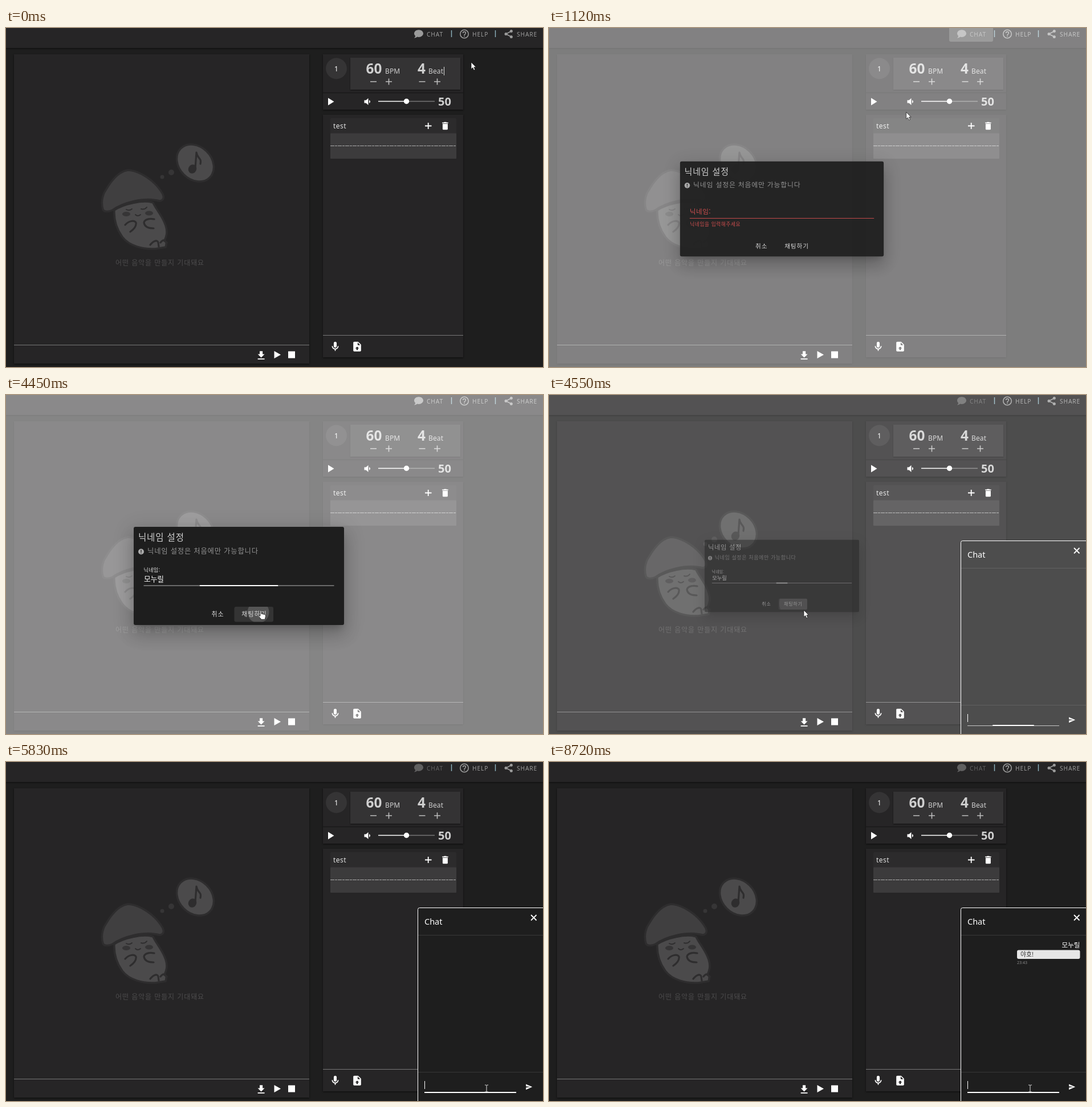
An HTML page that plays this animation: 942 by 594 pixels, repeating every 9220 ms.

```html
<!DOCTYPE html>
<html lang="ko">
<head>
<meta charset="utf-8">
<title>Chat nickname</title>
<style>
  html, body { margin: 0; width: 100%; height: 100%; overflow: hidden; background: #1e1e1e; }
  svg, #overlay, #dialog { position: absolute; left: 0; top: 0; }
  svg { display: block; }
  text { font-family: "Noto Sans", "Noto Sans CJK KR", sans-serif; fill: #fff; white-space: pre; }
  .ko { font-family: "Noto Sans CJK KR", "Noto Sans CJK", sans-serif; }
  .nav text { font-size: 10.2px; letter-spacing: .9px; fill: #9b9b9b; }
  .nav path { fill: #9b9b9b; }
  .big { font-weight: 700; fill: #cfcfcf; }
  .unit { font-size: 12px; letter-spacing: .15px; fill: #cfcfcf; }
  .panel { fill: #262526; filter: drop-shadow(0 1px 1.5px #0009); }
  .icon { fill: #fff; }
  .rule { stroke: #777; }
  .step { stroke: #bdbdbd; stroke-width: 1.6; fill: none; }
  .ink { stroke: #2e2d2e; stroke-width: 3.2; fill: none; stroke-linecap: round; stroke-linejoin: round; }
  #overlay { width: 942px; height: 594px; background: #fff; }
  #dialog { left: 224px; top: 231px; width: 369px; height: 172px; border-radius: 3px; background: #1e1e1e;
    box-shadow: 0 8px 11px -5px #0003, 0 18px 28px 2px #00000024, 0 7px 34px 6px #0000001f; }
</style>
</head>
<body>
<svg width="942" height="594" viewBox="0 0 942 594">
  <rect width="942" height="594" fill="#1e1e1e"/>
  <rect class="panel" x="-4" y="-4" width="950" height="39"/>

  <rect id="navGlow" x="702" y="-4" width="77" height="28" rx="3" fill="#fff"/>
  <g class="nav">
    <g id="chatNav">
      <path transform="translate(714.4 .8) scale(.8)" d="M12 3C17.5 3 22 6.58 22 11S17.5 19 12 19C10.76 19 9.57 18.82 8.47 18.5C5.55 21 2 21 2 21C4.33 18.67 4.7 17.1 4.75 16.5C3.05 15.07 2 13.13 2 11C2 6.58 6.5 3 12 3Z"/>
      <text x="738" y="14.5">CHAT</text>
    </g>
    <path transform="translate(794.4 .9) scale(.8)" d="M11 18H13V16H11V18M12 2A10 10 0 0 0 12 22A10 10 0 0 0 12 2M12 20A8 8 0 0 1 12 4A8 8 0 0 1 12 20M12 6A4 4 0 0 0 8 10H10A2 2 0 0 1 14 10C14 12 11 11.75 11 15H13C13 12.75 16 12.5 16 10A4 4 0 0 0 12 6Z"/>
    <text x="818" y="14.5">HELP</text>
    <path d="M886.5 5.5L877 10.5L886.5 15.5" style="fill:none;stroke:#9b9b9b;stroke-width:1.7"/>
    <g fill="#9b9b9b"><circle cx="886.3" cy="5.4" r="2.5"/><circle cx="877" cy="10.5" r="2.5"/><circle cx="886.3" cy="15.6" r="2.5"/></g>
    <text x="896" y="14.5">SHARE</text>
  </g>
  <path d="M781.5 4V16M858.5 4V16" stroke="#8fb4c0" stroke-width="1.4"/>

  <rect class="panel" x="14" y="46" width="518" height="542"/>
  <path class="rule" d="M14 555.5H532"/>
  <g class="icon">
    <path transform="translate(437.4 563.8) scale(.85)" d="M5 20H19V18H5M19 9H15V3H9V9H5L12 16L19 9Z"/>
    <path d="M470.5 566L482 572.5L470.5 579Z"/>
    <rect x="495" y="566.5" width="12" height="12"/>
  </g>

  <g stroke="#2e2d2e" stroke-width="3.5">
    <path fill="#4b4a4b" d="M190 319C205 309 240 300 258 306C262 316 275 330 280 346C284 358 281 366 278 373L282 376L280 384L262 387C240 388 216 382 204 366C194 352 189 336 190 319Z"/>
    <path fill="#403f40" d="M170 318C167 308 168 294 175 284C185 267 198 251 214 249C235 250 262 268 275 291C279 300 273 305 265 302C240 297 205 306 187 319C181 322 172 323 170 318Z"/>
    <ellipse fill="#4b4a4b" cx="332" cy="236.5" rx="36" ry="28.5" transform="rotate(45 332 236.5)"/>
  </g>
  <g fill="#363536">
    <ellipse cx="211" cy="326" rx="7" ry="4"/><ellipse cx="251" cy="324.5" rx="7" ry="4"/>
    <circle cx="274" cy="261" r="3.5"/><circle cx="290" cy="253" r="5"/>
  </g>
  <path class="ink" stroke-width="2" style="stroke-width:2" d="M211 318Q216 321 221 317M237 317Q243 319 247 314M227 327Q231 331 236 327"/>
  <path class="ink" d="M209 345C215 338 225 336 228 341C229 347 225 352 218 357M260 335C250 333 243 336 242 341C243 348 250 351 259 351M253 380C259 372 266 371 267 376L268 383M271 376C276 369 282 371 281 381"/>
  <ellipse cx="327" cy="247" rx="7" ry="8" fill="#2e2d2e" transform="rotate(25 327 247)"/>
  <path class="ink" d="M332 246L334 218C335 228 344 228 341 238"/>
  <text class="ko" x="192" y="416" font-size="12" letter-spacing=".9" font-weight="300" style="fill:#4c4b4c">어떤 음악을 만들지 기대돼요</text>

  <rect class="panel" x="556" y="46" width="246" height="97"/>
  <path d="M556 113.5H802" stroke="#191919" stroke-width="1.5"/>
  <circle cx="579.5" cy="71" r="18.5" fill="#353435"/>
  <text x="579.5" y="76" font-size="12" text-anchor="middle">1</text>
  <rect x="604" y="52" width="193" height="56" fill="#343334" style="filter:drop-shadow(0 1px 1px #0008)"/>
  <text class="big" x="631.5" y="80" font-size="24.3">60</text><text class="unit" x="665" y="80">BPM</text>
  <text class="big" x="722" y="80" font-size="24.3">4</text><text class="unit" x="741" y="80">Beat</text>
  <path id="beatCaret" d="M768.5 68V83" stroke="#ddd"/>
  <path class="step" d="M639 94H650M666 94H677M671.5 88.5V99.500M724.500 94H735.500M751 94H762M756.500 88.500V99.500"/>
  <path class="icon" d="M565 122.500L575.500 129L565 135.500ZM628.500 126.500H631.500L635.500 123V135L631.500 131.500H628.500ZM637 126Q641 129 637 132Z"/>
  <path d="M702 128.500H752" stroke="#757575" stroke-width="1.600"/>
  <path d="M653 128.500H702" stroke="#fff" stroke-width="1.600"/>
  <circle cx="702.500" cy="128.500" r="4.700" fill="#fff"/>
  <text class="big" x="758" y="135.500" font-size="20">50</text>

  <rect class="panel" x="556" y="152" width="246" height="425"/>
  <rect x="569" y="158" width="221" height="71" rx="2" fill="#2c2b2c"/>
  <rect x="569" y="184.500" width="221" height="44.500" rx="1" fill="#3c3b3c"/>
  <path d="M569 206.500H789" stroke="#aaa" stroke-dasharray="7 1 4 1"/>
  <text x="574" y="176" font-size="12" letter-spacing=".5" style="fill:#e4e4e4">test</text>
  <path d="M735 171.500H746.500M740.700 166V177" stroke="#fff" stroke-width="1.800"/>
  <path class="icon" transform="translate(761.400 162.500) scale(.75)" d="M19 4H15.500L14.500 3H9.500L8.500 4H5V6H19M6 19A2 2 0 0 0 8 21H16A2 2 0 0 0 18 19V7H6V19Z"/>
  <path class="rule" d="M556 538.500H802"/>
  <path class="icon" transform="translate(567.300 548) scale(.85)" d="M12 2A3 3 0 0 1 15 5V11A3 3 0 0 1 9 11V5A3 3 0 0 1 12 2M19 11C19 14.530 16.390 17.440 13 17.930V21H11V17.930C7.610 17.440 5 14.530 5 11H7A5 5 0 0 0 17 11H19Z"/>
  <path class="icon" fill-rule="evenodd" transform="translate(605.800 548) scale(.85)" d="M14 2H6C4.890 2 4 2.890 4 4V20C4 21.110 4.890 22 6 22H18C19.110 22 20 21.110 20 20V8L14 2M13.500 16V19H10.500V16H8L12 12L16 16H13.500M13 9V3.500L18.500 9H13Z"/>

  <g id="chat">
    <path d="M722.500 600V258.500Q722.500 255.500 725.500 255.500H950V600Z" fill="#1e1e1e" stroke="#fff"/>
    <text x="734" y="285" font-size="14.500" font-weight="500">Chat</text>
    <path d="M921 268L930.500 277.500M930.500 268L921 277.500" stroke="#fff" stroke-width="1.800"/>
    <path d="M723 303.500H942M723 543.500H942" stroke="#383838"/>
    <g id="message">
      <text class="ko" x="931.500" y="324.500" font-size="11.600" font-weight="500" text-anchor="end">모누릴</text>
      <rect x="821" y="329.500" width="110.500" height="15.500" rx="3" fill="#e6e6e6"/>
      <text class="ko" x="827" y="341" font-size="10.800" style="fill:#333">야호!</text>
      <text x="821" y="354" font-size="7" style="fill:#8a8a8a">23:43</text>
    </g>
    <text id="chatText" class="ko" x="735" y="570.500" font-size="11.600"></text>
    <path id="chatCaret" d="M.5 559V573" stroke="#fff"/>
    <path d="M734 579.500H895" stroke="#b5b5b5"/>
    <path id="chatLine" stroke="#fff" stroke-width="2"/>
    <path class="icon" transform="translate(911 563) scale(.53)" d="M2 21L23 12L2 3V10L17 12L2 14V21Z"/>
  </g>
</svg>

<div id="overlay"></div>

<div id="dialog">
  <svg width="369" height="172" viewBox="224 231 369 172">
    <clipPath id="buttonClip"><rect x="400.500" y="371" width="68.500" height="26.500" rx="3"/></clipPath>
    <text class="ko" x="232" y="255" font-size="15.500" letter-spacing=".85" style="fill:#d2d2d2">닉네임 설정</text>
    <circle cx="237" cy="274.500" r="5" fill="#aaa"/>
    <path d="M237 271.500V275.200M237 276.200V277.600" stroke="#1e1e1e" stroke-width="1.300"/>
    <text class="ko" x="248" y="278" font-size="12.300" letter-spacing=".82" style="fill:#929292">닉네임 설정은 처음에만 가능합니다</text>
    <text id="label" class="ko" font-size="12" letter-spacing=".5">닉네임:</text>
    <text id="error" class="ko" x="242" y="347.500" font-size="9" letter-spacing=".6" style="fill:#d04a4a">닉네임을 입력해주세요</text>
    <text id="nameText" class="ko" x="242" y="327" font-size="12.700" font-weight="500"></text>
    <path id="nameCaret" d="M.5 315V330" stroke="#fff"/>
    <path id="nameBase" d="M241.500 334H575.500"/>
    <path id="nameLine" stroke="#fff" stroke-width="2"/>
    <g clip-path="url(#buttonClip)">
      <rect id="hover" x="400" y="371" width="70" height="27" fill="#343434"/>
      <circle id="ripple" fill="#fff"/>
    </g>
    <text class="ko" x="360.500" y="388.300" font-size="11" letter-spacing=".98" style="fill:#ddd">취소</text>
    <text class="ko" x="413.300" y="388.300" font-size="11" letter-spacing=".98" style="fill:#ddd">채팅하기</text>
  </svg>
</div>

<svg width="942" height="594" viewBox="0 0 942 594">
  <g id="cursor" stroke-linejoin="round">
    <path id="arrow" d="M0 0V12L2.800 9.500L4.700 14L6.800 13L4.900 8.700H8.500Z" fill="#fff" stroke="#111" stroke-width=".7"/>
    <path id="hand" d="M-1 1.200Q0 -.6 1.200 1.200V6L7 7.200Q9 7.800 8.600 10.500L7.500 16H1L-3.500 10.500Q-3.500 8.600 -1 10Z" fill="#fff" stroke="#111" stroke-width=".8"/>
    <g id="beam" fill="none">
      <path d="M-3 -6H-.8L0 -5.200L.8 -6H3M0 -5.200V5.200M-3 6H-.8L0 5.200L.8 6H3" stroke="#ddd"/>
    </g>
  </g>
</svg>

<script>
const LOOP = 9220;
const $ = id => document.getElementById(id);
const clamp = v => Math.min(1, Math.max(0, v));

// Cubic bezier easing, solved by bisection.
function bezier(x1, y1, x2, y2) {
  const curve = (a, b, s) => 3 * a * s * (1 - s) ** 2 + 3 * b * s * s * (1 - s) + s ** 3;
  return x => {
    let lo = 0, hi = 1;
    for (let i = 0; i < 20; i++) {
      const mid = (lo + hi) / 2;
      if (curve(x1, x2, mid) < x) lo = mid; else hi = mid;
    }
    return x <= 0 ? 0 : x >= 1 ? 1 : curve(y1, y2, lo);
  };
}
const swing = bezier(.25, .8, .5, 1);
const pop = bezier(.25, .8, .25, 1);
const ramp = (t, start, ease = swing, length = 300) => ease(clamp((t - start) / length));
const linear = x => x;

// Time, x, y, shape from that time on.
const path = [
  [0, 816, 60, 'arrow'], [20, 816, 60, 'arrow'], [380, 718, 5, 'arrow'], [530, 720, 5, 'hand'],
  [980, 720, 5, 'hand'], [1010, 705, 26, 'arrow'], [1120, 627, 147, 'arrow'], [1500, 490, 295, 'arrow'],
  [1620, 465, 315, 'beam'], [1770, 452, 326, 'beam'], [3590, 452, 326, 'beam'], [3660, 452, 337, 'arrow'],
  [3950, 448, 378, 'arrow'], [4140, 446, 379, 'hand'], [4500, 447, 377, 'arrow'], [4600, 447, 377, 'arrow'],
  [5050, 868, 542, 'arrow'], [5260, 860, 582, 'arrow'], [5440, 859, 581, 'arrow'], [5540, 848, 573, 'beam'],
  [5690, 848, 573, 'beam'], [5830, 843, 572, 'beam'], [5990, 844, 572, 'beam'], [LOOP, 844, 572, 'beam']
];
const nameTyping = [[1840, ''], [2390, 'ㅁ'], [2500, '모'], [2730, '몬'], [2850, '모누'], [2950, '모눌'], [3050, '모누릴']];
const chatTyping = [[4500, ''], [6040, 'ㅇ'], [6200, '야'], [6500, '얗'], [6750, '야호'], [7310, '야호!'], [7650, '']];

const show = (id, on) => { $(id).style.visibility = on ? 'inherit' : 'hidden'; };
const alpha = (id, value) => { $(id).style.opacity = value; };

function drawCursor(t) {
  const i = path.findLastIndex(p => p[0] <= t);
  const a = path[i], b = path[i + 1] || a;
  const k = b === a ? 0 : (t - a[0]) / (b[0] - a[0]);
  const x = a[1] + (b[1] - a[1]) * k, y = a[2] + (b[2] - a[2]) * k;
  $('cursor').setAttribute('transform', `translate(${x} ${y})`);
  for (const shape of ['arrow', 'hand', 'beam']) show(shape, shape === a[3]);
}

function drawTyping(prefix, steps, t, focused) {
  const [since, value] = steps.findLast(s => s[0] <= t) || [0, ''];
  const text = $(prefix + 'Text'), caret = $(prefix + 'Caret');
  if (text.textContent !== value) text.textContent = value;
  const x = +text.getAttribute('x') + (value ? text.getComputedTextLength() : -1);
  caret.setAttribute('transform', `translate(${Math.round(x)} 0)`);
  show(prefix + 'Caret', focused && Math.floor((t - since) / 530) % 2 === 0);
}

function drawLine(id, left, right, y, amount) {
  const mid = (left + right) / 2, half = (right - left) / 2 * amount;
  $(id).setAttribute('d', `M${mid - half} ${y}H${mid + half}`);
}

function drawDialog(t) {
  const visible = ramp(t, 970, pop) - ramp(t, 4500, pop);
  const dialog = $('dialog');
  dialog.style.visibility = visible > 0 ? 'visible' : 'hidden';
  dialog.style.opacity = visible;
  dialog.style.transform = `scale(${.5 + visible / 2})`;

  const focus = ramp(t, 1830), red = t < 1830;
  $('label').setAttribute('transform', `translate(241.5 ${326.5 - 16.5 * focus}) scale(${1 - .25 * focus})`);
  $('label').style.fill = red ? '#d04a4a' : '#e6e6e6';
  $('nameBase').setAttribute('stroke', red ? '#d04a4a' : '#b5b5b5');
  alpha('error', 1 - focus);
  drawLine('nameLine', 241.5, 575.5, 334, focus - ramp(t, 4378));
  drawTyping('name', nameTyping, t, t >= 1840 && t < 4375);

  show('hover', t >= 4140);
  const grow = clamp((t - 4375) / 200), ripple = $('ripple');
  ripple.setAttribute('cx', 446 - 9 * grow);
  ripple.setAttribute('cy', 379 + 4 * grow);
  ripple.setAttribute('r', 6 + 34 * grow);
  alpha('ripple', t < 4375 ? 0 : .16 * (1 - ramp(t, 4500, linear)));
}

function draw(t) {
  const chatOpen = t >= 4500;
  alpha('overlay', .46 * (ramp(t, 950) - ramp(t, 4485)));
  alpha('navGlow', .2 * (ramp(t, 870, linear, 120) - ramp(t, 1150, linear, 250)));
  alpha('chatNav', chatOpen ? .5 : 1);
  show('beatCaret', t < 530);
  drawDialog(t);
  show('chat', chatOpen);
  show('message', t >= 7650);
  drawLine('chatLine', 734, 895, 579, ramp(t, 4500));
  drawTyping('chat', chatTyping, t, chatOpen);
  drawCursor(t);
}

const start = performance.now();
function tick() {
  draw((performance.now() - start) % LOOP);
  requestAnimationFrame(tick);
}
tick();
</script>
</body>
</html>
```
